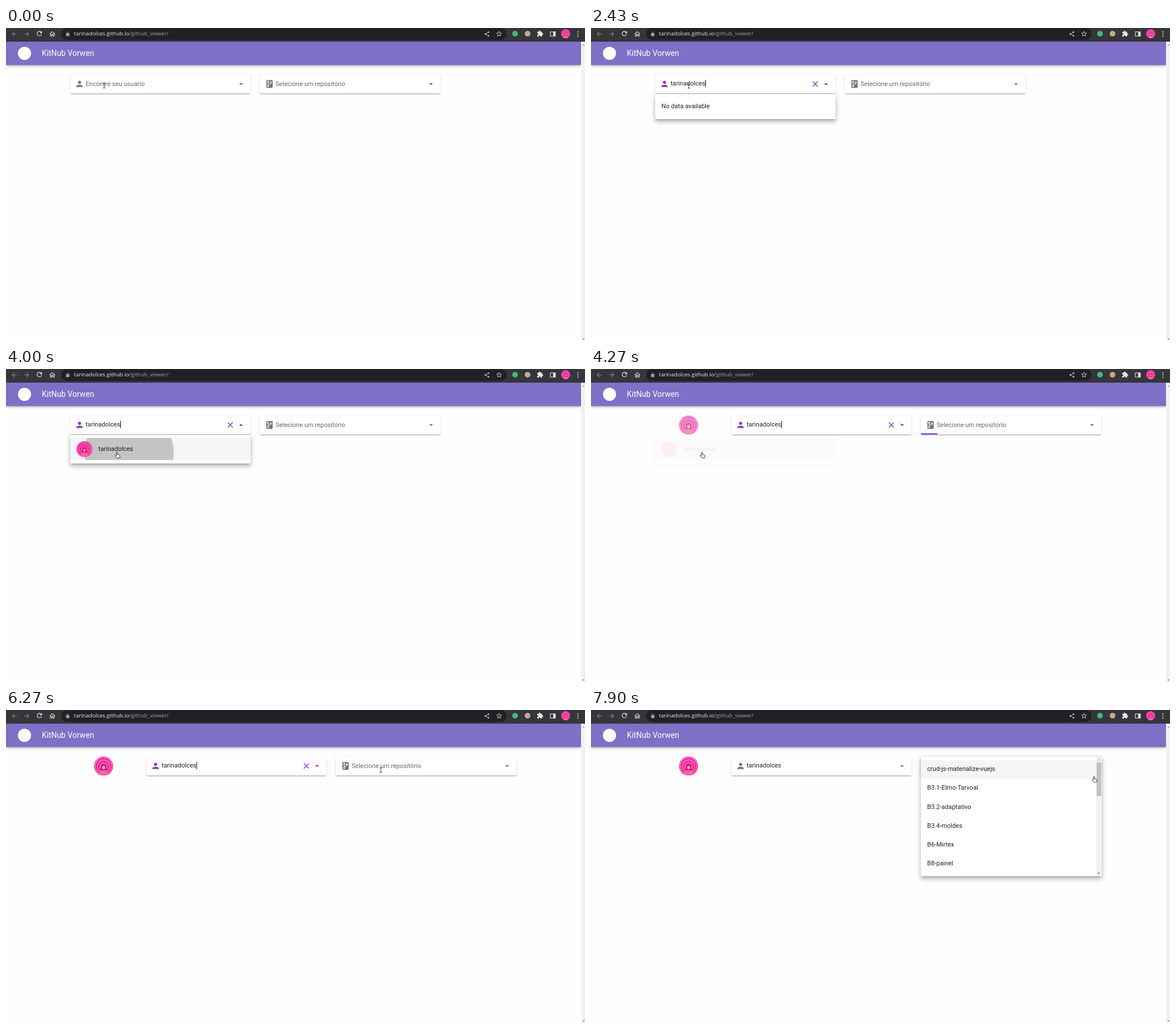
An HTML page for the animation above (8000 ms loop, 1018 px wide and 550 px high).

```html
<!DOCTYPE html>
<html lang="pt-BR">
<head>
<meta charset="utf-8">
<title>KitNub Vorwen</title>
<style>
  html, body { margin: 0; width: 100%; height: 100%; overflow: hidden; background: #fefefe; }
  #stage { position: absolute; left: 0; top: 0; width: 1018px; height: 550px; overflow: hidden;
    font: 11.08px/14px Roboto, sans-serif; color: rgba(0,0,0,.87); }
  #stage div, #stage svg { position: absolute; }
  svg { overflow: visible; display: block; }
  .text { white-space: pre; }
  .toolbar { left: 0; top: 0; width: 1018px; height: 24px; background: #35363a; }
  .address { left: 97px; top: 0; width: 783px; height: 20.5px; border-radius: 10px; background: #202124; }
  .url { font: 9.6px/14px "Open Sans", sans-serif; color: #9aa0a6; }
  .url b { font-weight: 400; color: #e8eaed; }
  .appbar { left: 0; top: 24px; width: 1011px; height: 41.4px; background: #7f6fc7;
    box-shadow: 0 1.4px 2.8px -.7px rgba(0,0,0,.2), 0 2.8px 3.5px rgba(0,0,0,.14), 0 .7px 7px rgba(0,0,0,.12); }
  .title { font-size: 13.85px; color: #fff; }
  .track { background: #f1f1f1; }
  .dot { border-radius: 50%; }
  .card { top: 81.6px; width: 317.8px; height: 33.3px; border-radius: 2.8px; background: #fff;
    box-shadow: 0 2.1px .7px -1.4px rgba(0,0,0,.2), 0 1.4px 1.4px rgba(0,0,0,.14), 0 .7px 3.5px rgba(0,0,0,.12); }
  .label { color: rgba(0,0,0,.6); }
  #caret { display: inline-block; width: .9px; height: 13px; margin: 0 0 -3px .2px; background: #000; }
  .clip { inset: 0; overflow: hidden; border-radius: 2.8px; }
  #loader { bottom: 0; height: 1.5px; background: #8e38be; }
  .menu { width: 317.8px; border-radius: 2.8px; background: #fff;
    box-shadow: 0 3.5px 3.5px -2px rgba(0,0,0,.2), 0 5.5px 7px .7px rgba(0,0,0,.14), 0 2px 9.7px 1.4px rgba(0,0,0,.12); }
  .row { left: 0; width: 100%; overflow: hidden; }
  #ripple { border-radius: 50%; background: #000; }
</style>
</head>
<body>
<div id="stage"></div>
<script>
const LOOP = 8000, USER = 'tarinadolces';
const GRAY = [117, 117, 117], PURPLE = [142, 56, 190];
const REPOS = ['crud-js-materialize-vuejs', 'B3.1-Elmo-Tarvoal', 'B3.2-adaptativo',
  'B3.4-moldes', 'B6-Mirtex', 'B8-painel'];

const shapes = {
  back: '<path d="M20 11v2H8l5.5 5.5-1.42 1.42L4.16 12l7.92-7.92L13.5 5.5 8 11z"/>',
  forward: '<path d="M4 11v2h12l-5.5 5.5 1.42 1.42L19.84 12l-7.92-7.92L10.5 5.5 16 11z"/>',
  reload: '<path d="M17.65 6.35A8 8 0 1 0 19.73 14h-2.08A6 6 0 1 1 16.22 7.78L13 11h7V4z"/>',
  home: '<path d="M12 5.69l5 4.5V18h-2v-6H9v6H7v-7.81zM12 3L2 12h3v8h6v-6h2v6h6v-8h3z"/>',
  lock: '<path d="M18 8h-1V6A5 5 0 0 0 7 6v2H6a2 2 0 0 0-2 2v10a2 2 0 0 0 2 2h12a2 2 0 0 0 2-2V10a2 2 0 0 0-2-2M9 6a3 3 0 0 1 6 0v2H9z"/>',
  share: '<circle cx="18" cy="5" r="3"/><circle cx="6" cy="12" r="3"/><circle cx="18" cy="19" r="3"/><path d="M18 5L6 12l12 7" fill="none" stroke="currentColor" stroke-width="2"/>',
  star: '<path d="M12 3.8l2.5 5.8 6.3.5-4.8 4.2 1.5 6.1L12 17.1l-5.5 3.3L8 14.3l-4.8-4.2 6.3-.5z" fill="none" stroke="currentColor" stroke-width="2"/>',
  puzzle: '<path d="M20.5 11H19V7a2 2 0 0 0-2-2h-4V3.5a2.5 2.5 0 0 0-5 0V5H4a2 2 0 0 0-2 2v3.8h1.5a2.7 2.7 0 0 1 0 5.4H2V20a2 2 0 0 0 2 2h3.8v-1.5a2.7 2.7 0 0 1 5.4 0V22H17a2 2 0 0 0 2-2v-4h1.5a2.5 2.5 0 0 0 0-5"/>',
  panel: '<path d="M3 4h18v16H3zM5 6v12h8V6z" fill-rule="evenodd"/>',
  dots: '<circle cx="12" cy="5" r="2"/><circle cx="12" cy="12" r="2"/><circle cx="12" cy="19" r="2"/>',
  user: '<circle cx="12" cy="8" r="4"/><path d="M12 14c4.42 0 8 1.79 8 4v2H4v-2c0-2.21 3.58-4 8-4"/>',
  repo: '<rect x="4" y="2" width="16" height="20" rx="2"/><g fill="none" stroke="#fff" stroke-width="1.5"><circle cx="8.5" cy="6.5" r="1.6"/><circle cx="15.5" cy="8" r="1.6"/><circle cx="8.5" cy="17.5" r="1.6"/><path d="M8.5 8v8M15.5 9.6c0 3.2-7 2-7 5"/></g>',
  down: '<path d="M7 10l5 5 5-5z"/>',
  up: '<path d="M7 15l5-5 5 5z"/>',
  close: '<path d="M19 6.41L17.59 5 12 10.59 6.41 5 5 6.41 10.59 12 5 17.59 6.41 19 12 13.41 17.59 19 19 17.59 13.41 12z"/>',
  avatar: `<clipPath id="round"><circle cx="12" cy="12" r="12"/></clipPath>
    <g clip-path="url(#round)"><rect width="24" height="24" fill="#f0229a"/>
    <g fill="none" stroke="#ff9ad4" stroke-width=".8"><circle cx="12" cy="12" r="4.6"/><circle cx="12" cy="12" r="7.8"/><circle cx="12" cy="12" r="10.6"/></g>
    <path d="M8.6 18v-4a3.4 3.6 0 0 1 6.8 0v4z" fill="#c01862"/><circle cx="12" cy="13.8" r="2" fill="#f3a3a8"/>
    <path d="M6 24c0-5 2.5-7 6-7s6 2 6 7z" fill="#f6679f"/></g>`
};

// Icons are placed by their centre.
const icon = (name, x, y, size = 16.6, color = '#757575', id = '') =>
  `<svg ${id && `id="${id}"`} viewBox="0 0 24 24" width="${size}" height="${size}" fill="currentColor"
    style="left:${x - size / 2}px;top:${y - size / 2}px;color:${color}">${shapes[name]}</svg>`;
const text = (str, x, y, cls = '', id = '') =>
  `<div ${id && `id="${id}"`} class="text ${cls}" style="left:${x}px;top:${y - 7}px">${str}</div>`;
const box = (cls, x, y, w, h, more = '') =>
  `<div class="${cls}" style="left:${x}px;top:${y}px;width:${w}px;height:${h}px;${more}"></div>`;
const dot = (x, y, r, color) => box('dot', x - r, y - r, 2 * r, 2 * r, `background:${color}`);

const LIGHT = '#e8eaed', DIM = '#86878b';
const browser = `<div class="toolbar"></div><div class="address"></div>
  ${icon('back', 14.5, 10, 13, DIM)}${icon('forward', 36.8, 10, 13, DIM)}
  ${icon('reload', 59, 10, 13.5, LIGHT)}${icon('home', 81, 10, 13, LIGHT)}
  ${icon('lock', 108.5, 10.3, 9, '#9aa0a6')}
  ${text(`<b>${USER}.github.io</b>/github_viewer/`, 119.5, 10.3, 'url')}
  ${icon('share', 845, 10.2, 11, '#c4c7cb')}${icon('star', 867.3, 10, 12, '#c4c7cb')}
  ${dot(895, 10.2, 5, '#41b883')}${dot(917, 10.3, 5, '#c9a98a')}
  ${icon('puzzle', 939, 10, 12, LIGHT)}${icon('panel', 961, 10.2, 13, LIGHT)}
  ${icon('avatar', 984, 10, 16)}${icon('dots', 1005.5, 10.2, 13, LIGHT)}`;

const page = `<div class="appbar"></div>${dot(32.5, 44.2, 11.7, '#fff')}
  ${text('KitNub Vorwen', 63, 44.2, 'title')}
  ${box('track', 1011, 24, 7, 526)}${icon('up', 1015, 29.2, 9, '#8b8b8b')}${icon('down', 1015, 546, 9, '#6b6b6b')}
  ${icon('avatar', 171.3, 98.4, 33.3, '', 'photo')}
  <div id="fields">
    <div class="card" style="left:112.6px"></div>
    ${icon('user', 129, 98.4, 16.6, '', 'userIcon')}
    ${text('Encontre seu usuário', 140, 99, 'label', 'userLabel')}
    ${text('<span id="typed"></span><i id="caret"></i>', 140, 98.3)}
    ${icon('close', 394, 98.4, 16.6, '', 'clear')}
    ${icon('down', 413.6, 98.4, 16.6, '', 'userArrow')}
    <div class="card" style="left:446.4px"><div class="clip"><div id="loader"></div></div></div>
    ${icon('repo', 463, 98.4, 16.6, '', 'repoIcon')}
    ${text('Selecione um repositório', 474, 99, 'label', 'repoLabel')}
    ${icon('down', 747.3, 98.4, 16.6, '', 'repoArrow')}
  </div>
  <div id="userMenu" class="menu" style="left:112.6px;top:116px">
    ${text('No data available', 11.2, 21.8, '', 'empty')}
    <div id="userRow" class="row" style="top:5.4px;height:38.8px"><div id="ripple"></div>
      ${icon('avatar', 25, 19.3, 27.7, '', 'thumb')}${text(USER, 50, 19.2)}</div>
  </div>
  <div id="repoMenu" class="menu" style="left:580px;top:82px;height:210.2px">
    <div id="repoRow" class="row" style="top:5.5px;width:308px;height:33.2px;background:#f5f5f5"></div>
    ${REPOS.map((name, i) => text(name, 11, 22.1 + i * 33.2)).join('')}
    ${box('track', 308, 0, 9.8, 210.2)}${box('', 308.8, 10, 7.8, 59, 'background:#c1c1c1')}
    ${icon('up', 312.8, 5.2, 10, '#9a9a9a')}${icon('down', 312.8, 204.6, 10, '#505050')}
  </div>`;

const pointer = `<svg id="cursor" width="1" height="1" stroke-linejoin="round">
  <path id="beam" d="M-2-4.2Q0-4.2 0-3Q0-4.2 2-4.2M0-3.4V3.4M-2 4.2Q0 4.2 0 3Q0 4.2 2 4.2" fill="none" stroke="#222" stroke-width=".9"/>
  <path id="hand" transform="translate(-4.8 -5)" d="M3 6.5V1.3C3-.1 4.9-.1 4.9 1.3V4.2L8 5C9 5.2 9.4 5.8 9.2 6.7L8.5 10.4H4L.9 6.9C.3 6 1.4 5.2 2.1 5.8Z" fill="#fff" stroke="#222" stroke-width=".9"/>
  <path id="arrow" transform="translate(-3 -5)" d="M0 0V9.5L2.3 7.4 3.9 11 5.4 10.3 3.9 6.9H7Z" fill="#111" stroke="#fff" stroke-width=".7"/>
</svg>`;

stage.innerHTML = page + browser + pointer;
const $ = id => document.getElementById(id);

const bezier = (x1, y1, x2, y2) => p => {
  if (p <= 0 || p >= 1) return p <= 0 ? 0 : 1;
  const at = (a, b, u) => 3 * a * u * (1 - u) ** 2 + 3 * b * u * u * (1 - u) + u ** 3;
  let lo = 0, hi = 1;
  for (let i = 0; i < 24; i++) {
    const mid = (lo + hi) / 2;
    if (at(x1, x2, mid) < p) lo = mid; else hi = mid;
  }
  return at(y1, y2, lo);
};
const swift = bezier(.25, .8, .25, 1), ease = bezier(.25, .1, .25, 1);
const ramp = (t, start, ms = 300, curve = swift) => curve((t - start) / ms);
const lerp = (a, b, p) => a + (b - a) * p;
const tint = p => `rgb(${GRAY.map((g, i) => lerp(g, PURPLE[i], p))})`;

const FOCUS = 470, FOUND = 3200, PRESS = 3976, PICK = 4150, OPEN = 6750, LOADED = 5480;
const KEYS = [950, 1100, 1230, 1370, 1490, 1610, 1730, 1870, 1970, 2170, 2270, 2430];
const BLINKS = [FOCUS, ...KEYS, 2470, 3900, 4030];

// time, x, y, cursor kind from then on
const PATH = [
  [0, 172.5, 101.5, 'beam'], [199, 172.5, 101.5, 'beam'], [200, 172, 102, 'beam'],
  [3500, 172, 102, 'beam'], [3600, 181, 120, 'hand'], [3770, 196, 151, 'hand'],
  [4320, 196, 151, 'arrow'], [4430, 247, 122, 'beam'], [4700, 490, 111, 'beam'],
  [5030, 538.5, 109.7, 'beam'], [5200, 564, 108, 'arrow'], [5260, 580, 107, 'beam'],
  [5500, 659, 104, 'beam'], [5570, 659, 104.5, 'beam'], [5670, 659, 106, 'beam'],
  [5869, 659, 106, 'beam'], [5870, 659, 106.4, 'beam'], [6270, 659, 105.6, 'beam'],
  [6780, 660, 108, 'hand'], [6950, 660, 108, 'hand'], [7300, 809.5, 113.5, 'hand'],
  [7380, 809.5, 113.5, 'hand'], [7900, 885.3, 121.5, 'hand'], [LOOP, 885.3, 121.5, 'hand']
];

function show(id, on) { $(id).style.visibility = on ? 'inherit' : 'hidden'; }

function drawCursor(t) {
  const i = PATH.findIndex(k => k[0] > t), a = PATH[i - 1], b = PATH[i];
  const p = (t - a[0]) / (b[0] - a[0]);
  $('cursor').style.transform = `translate(${lerp(a[1], b[1], p)}px,${lerp(a[2], b[2], p)}px)`;
  for (const kind of ['beam', 'hand', 'arrow']) show(kind, kind === a[3]);
}

function drawUserField(t) {
  const focus = ramp(t, FOCUS) - ramp(t, OPEN);
  const turn = ramp(t, FOCUS) - ramp(t, PICK - 20);
  $('fields').style.transform = `translateX(${t < PICK ? 0 : 133.7}px)`;
  $('photo').style.opacity = ramp(t, PICK, 300, ease);
  show('userLabel', t < FOCUS);
  $('typed').textContent = USER.slice(0, KEYS.filter(k => k <= t).length);
  const reset = BLINKS.filter(k => k <= t).pop();
  show('caret', t >= FOCUS && t < OPEN && (t - reset) % 1000 < 500);
  for (const id of ['userIcon', 'clear', 'userArrow']) $(id).style.color = tint(focus);
  $('clear').style.opacity = t < KEYS[0] ? 0 : 1 - ramp(t, OPEN);
  $('userArrow').style.transform = `rotate(${180 * turn}deg)`;
}

function drawUserMenu(t) {
  const found = t >= FOUND;
  $('userMenu').style.opacity = ramp(t, FOCUS + 20) - ramp(t, PICK - 20);
  $('userMenu').style.height = (found ? 49.6 : 44.2) + 'px';
  show('empty', !found);
  show('userRow', found);
  $('userRow').style.background = t > 3600 && t < 4320 ? '#f5f5f5' : '';
  $('thumb').style.opacity = ramp(t, FOUND, 300, ease);
  // The ripple grows from the pointer towards the middle of the row.
  const p = ramp(t, PRESS), r = 160 * lerp(.3, 1, p);
  Object.assign($('ripple').style, {
    left: lerp(83.4, 158.9, p) - r + 'px', top: lerp(29, 19.4, p) - r + 'px',
    width: 2 * r + 'px', height: 2 * r + 'px',
    opacity: t < PRESS ? 0 : .2 * (1 - ramp(t, PRESS + 250))
  });
}

function drawRepoField(t) {
  const focus = ramp(t, OPEN), run = ramp(t, PICK, 1320, ease);
  show('loader', t >= PICK && t < LOADED);
  $('loader').style.left = Math.max(0, lerp(-200, 107, run)) + '%';
  $('loader').style.right = Math.max(0, lerp(100, -8, run)) + '%';
  show('repoLabel', t < OPEN);
  for (const id of ['repoIcon', 'repoArrow']) $(id).style.color = tint(focus);
  $('repoArrow').style.transform = `rotate(${180 * focus}deg)`;
  $('repoMenu').style.opacity = ramp(t, OPEN + 28);
  $('repoRow').style.opacity = ramp(t, OPEN + 90, 200);
}

const begin = performance.now();
function tick() {
  const t = (performance.now() - begin) % LOOP;
  drawUserField(t);
  drawUserMenu(t);
  drawRepoField(t);
  drawCursor(t);
  requestAnimationFrame(tick);
}
tick();
</script>
</body>
</html>
```
